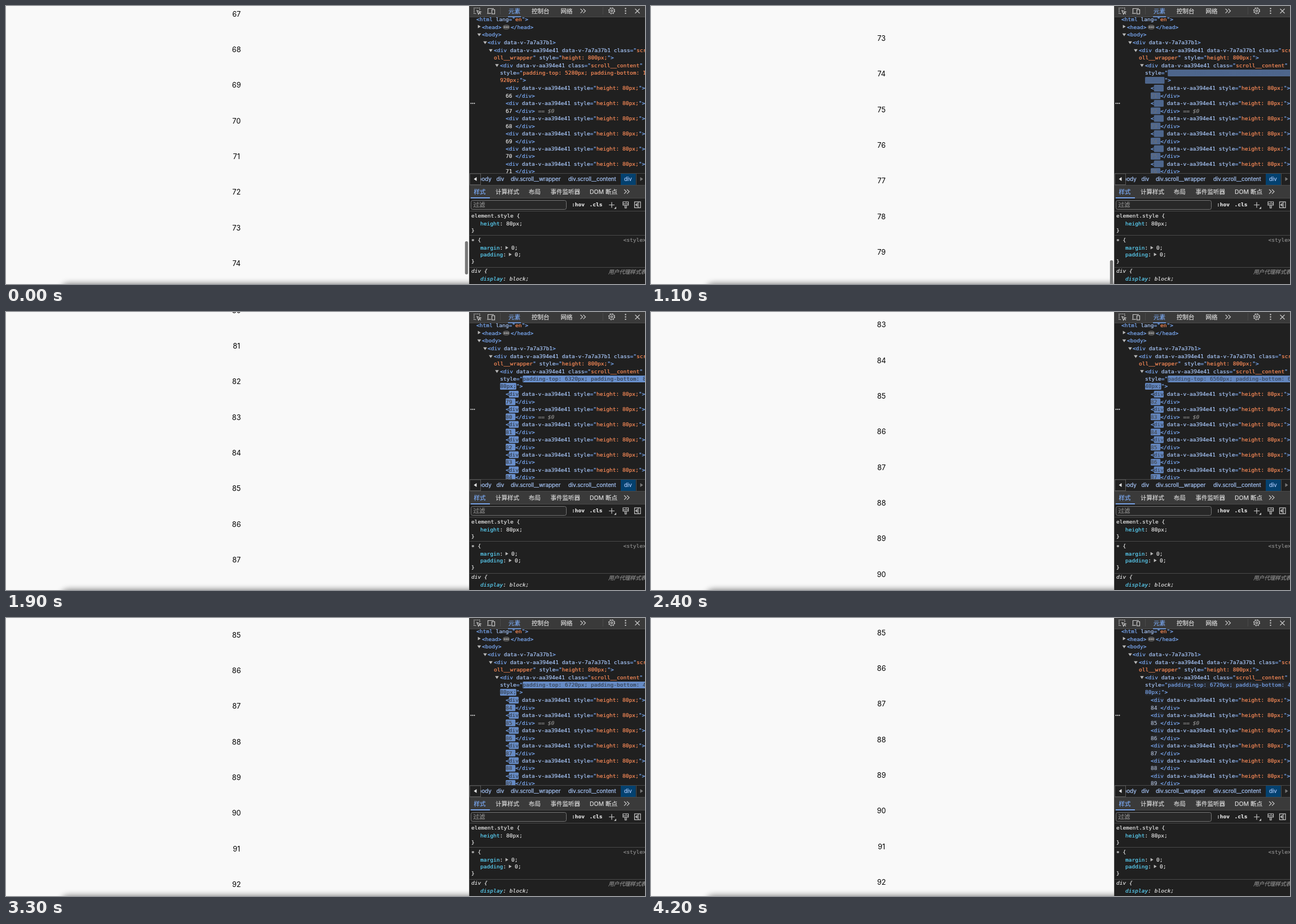
Recreate the animation shown at these times as an HTML page. Size 1133 by 494 pixels, loop 4300 ms.

```html
<!DOCTYPE html>
<html lang="zh">
<head>
<meta charset="utf-8">
<title>Virtual scroll</title>
<style>
html, body { margin: 0; width: 100%; height: 100%; overflow: hidden; background: #f9f9f9; }
svg { display: block; position: absolute; left: 0; top: 0; }
text { white-space: pre; }
.mono, .ui, .cjk { fill: currentColor; stroke: currentColor; stroke-width: .2; }
.mono { font: 9.55px "DejaVu Sans Mono", monospace; color: #e3e3e3; }
.ui { font: 9.75px Inter, sans-serif; color: #a8c7fa; }
.cjk { font: 10.5px Inter, "Noto Sans CJK SC", "Noto Sans CJK", sans-serif; color: #dcdcdc; }
.num { font: 12.67px Inter, sans-serif; fill: #000; text-anchor: middle; }
.tag { color: #7cacf8; }
.attr { color: #a8c7fa; }
.val { color: #fe8d59; }
.prop { color: #5cd5fb; }
.dim { color: #8b8b8b; }
.it { font-style: italic; }
.b { font-weight: bold; }
.small { font-size: 9.6px; }
.hl { fill: #7cacf8; stroke: none; }
.line { stroke: #4a4a4a; stroke-width: 1; fill: none; }
.icon { stroke: #c7c7c7; stroke-width: 1.2; fill: none; }
.tri { fill: #b8b8b8; stroke: none; }
</style>
</head>
<body>
<svg width="1133" height="494" viewBox="0 0 1133 494">
  <defs>
    <filter id="blur" x="-10%" y="-100%" width="120%" height="300%"><feGaussianBlur stdDeviation="5.500"/></filter>
  </defs>
  <rect width="821" height="494" fill="#f9f9f9"/>
  <g id="list" class="num"></g>
  <rect x="98" y="493.500" width="800" height="40" rx="12" opacity=".52" filter="url(#blur)"/>
  <rect id="thumb" x="813.8" width="5.4" height="59" rx="2.7" fill="#777"/>

  <rect x="821" width="312" height="494" fill="#202020"/>
  <g id="tree" class="mono"></g>

  <rect x="821" width="312" height="20" fill="#3a3a3a"/>
  <path class="line" d="M821 19.500h312M876.500 2v13M1058.500 2v13"/>
  <rect x="890" y="18.500" width="23" height="1.500" fill="#7cacf8"/>
  <g class="icon">
    <path d="M840 7V3.5H830V13.5h4" stroke-dasharray="2 1.1"/>
    <path d="M835 8l7 2.5-3 1.2-1.2 3zM839 11.5l3 3"/>
    <path d="M854.5 12V4.5H865M853 13.2h7"/><rect x="861.5" y="6.5" width="5" height="7.5"/>
    <path d="M1018.500 5l4 3.800-4 3.800M1023.500 5l4 3.800-4 3.800"/>
    <circle cx="1074" cy="8.500" r="4.500"/><circle cx="1074" cy="8.500" r="1.700"/>
    <circle cx="1074" cy="8.500" r="5.500" stroke-dasharray="2.160 2.160"/>
    <path d="M1115.500 5l8 8M1123.500 5l-8 8"/>
  </g>
  <g fill="#c7c7c7"><circle cx="1098.500" cy="4.500" r="1.200"/><circle cx="1098.500" cy="8.700" r="1.200"/><circle cx="1098.500" cy="12.900" r="1.200"/></g>

  <rect x="821" y="297" width="312" height="22" fill="#202020"/>
  <path class="line" d="M821 297.500h312M821 318.500h312M1117.500 298v20"/>
  <rect x="1090" y="298" width="26.500" height="20" fill="#04416f"/>
  <g id="crumbs" class="ui"></g>
  <rect x="822.500" y="298" width="19" height="19.500" fill="#202020" stroke="#5a5a5a"/>
  <path d="M834.500 304v7l-5-3.500z" fill="#e3e3e3"/>
  <path d="M1124.500 304v7l5-3.500z" fill="#777"/>

  <rect x="821" y="319" width="312" height="22.500" fill="#3a3a3a"/>
  <path class="line" d="M821 341.500h312M821 364.500h312M821 407.500h312M821 464.500h312"/>
  <rect x="824" y="340" width="34" height="1.800" fill="#7cacf8"/>
  <rect x="824.500" y="345.500" width="169" height="16" rx="3" fill="#282828" stroke="#757575"/>
  <g class="icon">
    <path d="M1096 326l4 3.800-4 3.800M1101 326l4 3.800-4 3.800"/>
    <path d="M1069 353.500h10M1074 348.500v10"/>
    <path d="M1094 348h9.500v6h-9.500zM1094 351.500h9.500M1097.500 354v5h2.500v-5M1099.500 348v2"/>
    <rect x="1114.500" y="348" width="10.500" height="10.500"/><path d="M1121 348v10.500M1119 351v4.500l-2.500-2.300z"/>
  </g>
  <path d="M1082 356.500v4h-4z" fill="#c7c7c7"/>
  <g id="labels" class="cjk"></g>
  <g id="rules" class="mono"></g>
  <path d="M821.500 0v494" stroke="#4a4a4a"/>
</svg>
<script>
const LOOP = 4300, TICK = 100, FLASH = 1400;
const ROW = 63.333, CH = 5.75;
const $ = id => document.getElementById(id);
const esc = s => s.replace(/&/g, '&amp;').replace(/</g, '&lt;');
const span = cls => s => `<tspan class="${cls}">${esc(s)}</tspan>`;
const T = span('tag'), A = span('attr'), V = span('val'), P = span('prop'), D = span('dim');
const text = (x, y, body, cls = '') => `<text x="${x}" y="${y + 3.4}" class="${cls}">${body}</text>`;
const down = (x, y) => `<path class="tri" d="M${x - 3.3} ${y - 2.3}h6.600l-3.300 5z"/>`;
const right = (x, y) => `<path class="tri" d="M${x - 2.3} ${y - 3}v6l5-3z"/>`;
const box = (x, y, n, id = '') => `<rect class="hl" id="${id}" x="${x}" y="${y - 6}" width="${n * CH}" height="12" rx="1.5"/>`;
const dots = (xs, y) => xs.map(x => `<circle cx="${x}" cy="${y}" r=".9"/>`).join('');

// Element tree
const HASH = 'data-v-aa394e41', OUTER = 'data-v-7a7a37b1';
let tree = text(834, 23.5, T('<html ') + A('lang') + T('="') + V('en') + T('">'))
  + right(839, 36.5) + text(844, 37.5, T('<head>')) + text(895, 37.5, T('</head>'))
  + '<rect x="881.500" y="34" width="11" height="7" rx="3.500" fill="#444" stroke="#888" stroke-width=".7"/>'
  + dots([884, 887, 890], 37.5)
  + down(839, 51) + text(844, 51, T('<body>'))
  + down(849.5, 65) + text(854, 65, T('<div ') + A(OUTER) + T('>'))
  + down(859.5, 79) + text(865, 79, T('<div ') + A(`${HASH} ${OUTER} class`) + T('="') + V('scr'))
  + text(865, 92, V('oll__wrapper') + T('" ') + A('style') + T('="') + V('height: 800px;') + T('">'))
  + down(870.5, 105.5) + text(876, 105.5, T('<div ') + A(HASH + ' class') + T('="') + V('scroll__content') + T('"'))
  + box(876 + 7 * CH, 119, 38) + box(876, 132, 6, 'wrapBox')
  + text(876, 119, A('style') + T('="') + '<tspan id="pad"></tspan>')
  + text(876, 132, '<tspan id="wrap"></tspan>' + T('">'))
  + dots([824.5, 827.5, 830.5], 173);
for (let i = 0; i < 6; i++) {
  const y = 146 + i * 26.9;
  tree += box(886 + CH, y, 3) + box(886, y + 13.4, 3)
    + text(886, y, T('<') + '<tspan class="name">div</tspan> ' + A(HASH + ' style') + T('="') + V('height: 80px;') + T('">'))
    + text(886, y + 13.4, '<tspan class="idx"></tspan>' + T('</div>') + (i === 1 ? '<tspan class="dim it"> == $0</tspan>' : ''));
}
$('tree').innerHTML = tree;

// Static panel text
$('crumbs').innerHTML = [[837.5, 'body'], [869.5, 'div'], [895, 'div.scroll__wrapper'], [997, 'div.scroll__content'], [1096, 'div']]
  .map(([x, s]) => text(x, 307.5, s)).join('');
$('labels').innerHTML = [
  [891, 9, '元素', 'tag'], [932, 9, '控制台'], [983.5, 9, '网络'],
  [829.5, 330, '样式', 'tag'], [868, 330, '计算样式'], [927, 330, '布局'], [965.5, 330, '事件监听器'], [1035, 330, 'DOM 断点'],
  [828.5, 353.5, '过滤', 'dim'], [1068, 472.5, '用户代理样式表', 'dim it small']
].map(([x, y, s, c]) => text(x, y + .4, s, c)).join('');
$('rules').innerHTML = text(1003, 353, ':hov', 'b') + text(1034.5, 353, '.cls', 'b')
  + text(825, 372.5, 'element.style {') + text(841, 386.5, P('height') + ': 80px;') + text(825, 398.5, '}')
  + text(825, 418, '*') + text(825 + 2 * CH, 416, '{') + text(1094.5, 416, D('<style>'))
  + text(841, 430, P('margin') + ':') + right(888, 429.5) + text(896, 430, '0;')
  + text(841, 442, P('padding') + ':') + right(894, 441.5) + text(902, 442, '0;') + text(825, 454, '}')
  + text(825, 471, 'div {', 'it') + text(841, 485, P('display') + ': block;', 'it');

let rows = '';
for (let n = 64; n < 100; n++) rows += `<text x="408.700" y="${(n * ROW + 4.6).toFixed(2)}">${n}</text>`;
$('list').innerHTML = rows;

// Scroll offset: monotone spline through the flicks
const knots = [[0, 4229.3], [600, 4389.3], [820, 4506], [1100, 4565.8], [1820, 5012], [1900, 5069.5],
  [2560, 5266], [2800, 5294], [3100, 5312], [3200, 5330], [3300, 5353.3], [3550, 5357.3], [LOOP, 5357.3]];
const rise = knots.slice(1).map(([t, s], i) => (s - knots[i][1]) / (t - knots[i][0]));
const slope = knots.map((_, i) => {
  const a = rise[i - 1], b = rise[i];
  return a > 0 && b > 0 ? 2 * a * b / (a + b) : 0;
});
function scroll(t) {
  let i = 0;
  while (i < rise.length - 1 && t >= knots[i + 1][0]) i++;
  const [t0, s0] = knots[i], [t1, s1] = knots[i + 1];
  const h = t1 - t0, u = (t - t0) / h, v = 1 - u;
  return s0 * v * v * (1 + 2 * u) + s1 * u * u * (3 - 2 * u) + h * u * v * (slope[i] * v - slope[i + 1] * u);
}
const first = t => Math.floor((scroll(t) - 8.33) / ROW);

// Moments at which the rendered range moves on
const updates = [];
for (let t = 10; t < LOOP; t += 10) if (first(t) !== first(t - 10)) updates.push(t);

// cubic-bezier(0, 0, .2, 1)
function ease(x) {
  let lo = 0, hi = 1;
  for (let i = 0; i < 20; i++) {
    const m = (lo + hi) / 2;
    if (.6 * (1 - m) * m * m + m ** 3 < x) lo = m; else hi = m;
  }
  return 3 * (1 - lo) * lo * lo + lo ** 3;
}
const mix = (to, p) => `rgb(${to.map(c => Math.round(32 + (c - 32) * p))})`;
const BLUE = [124, 172, 248], PALE = [178, 192, 218];
const boxes = document.querySelectorAll('.hl'), names = document.querySelectorAll('.name'), idx = document.querySelectorAll('.idx');

function draw(t) {
  const s = scroll(t), start = first(t);
  $('list').setAttribute('transform', `translate(0 ${-s})`);
  $('thumb').setAttribute('y', 418 + (s - knots[0][1]) * .1);

  const bottom = String(7200 - start * 80);
  const tail = bottom.slice(1) + 'px;';
  $('pad').textContent = `padding-top: ${start * 80}px; padding-bottom: ${bottom[0]}`;
  $('wrap').textContent = tail;
  $('wrapBox').setAttribute('width', tail.length * CH);

  const since = t - (updates.filter(u => u <= t).pop() ?? -FLASH);
  const on = since < FLASH, p = on ? ease(since / FLASH) : 1;
  boxes.forEach(b => b.style.opacity = 1 - p);
  $('pad').style.color = $('wrap').style.color = on ? mix(BLUE, p) : '#fe8d59';
  names.forEach(n => n.style.color = mix(BLUE, p));
  idx.forEach((n, i) => {
    n.textContent = start + i + ' ';
    n.style.color = on ? mix(PALE, p) : '#e3e3e3';
  });
}
function frame(now) {
  draw(Math.floor(now % LOOP / TICK) * TICK);
  requestAnimationFrame(frame);
}
draw(0);
requestAnimationFrame(frame);
</script>
</body>
</html>
```
